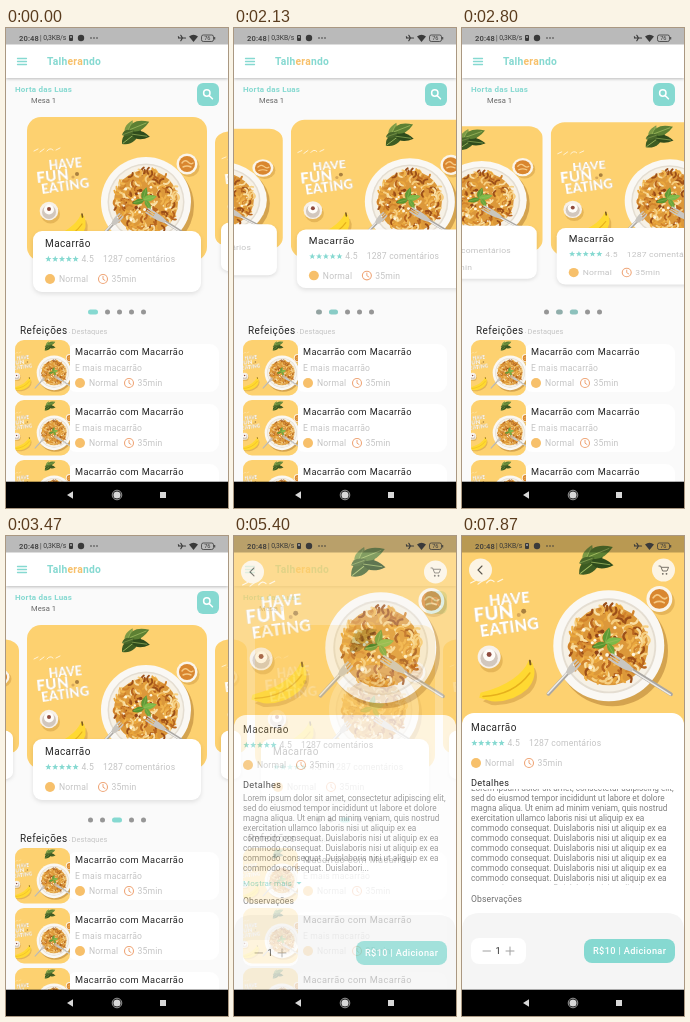
Animation of 222x480 px, one loop 8 s. Source, as an HTML page:

```html
<!DOCTYPE html>
<html lang="pt">
<head>
<meta charset="utf-8">
<title>Cardápio</title>
<style>
html, body { margin: 0; width: 100%; height: 100%; overflow: hidden; background: #fafafa; }
svg { display: block; width: 100vw; height: 100vh; font-family: Roboto, "Noto Sans", sans-serif; }
text { white-space: pre; }
.soft { filter: drop-shadow(0 2px 2px rgba(0,0,0,.1)); }
</style>
</head>
<body>
<svg id="stage" viewBox="0 0 222 480" preserveAspectRatio="none"></svg>
<script>
const LOOP = 8000, TEAL = '#86d9d1', AMBER = '#f7c06b', DARK = '#262626', PALE = '#c4c4c4', YELLOW = '#fdd170';
const CARDS = 5, PITCH = 188;

let seed = 11;
const rnd = () => (seed = seed * 16807 % 2147483647) / 2147483647;
const rep = (n, fn) => Array.from({length: n}, (_, i) => fn(i)).join('');
const rect = (x, y, w, h, fill, r = 0, more = '') =>
  `<rect x="${x}" y="${y}" width="${w}" height="${h}" rx="${r}" fill="${fill}" ${more}/>`;
const dot = (x, y, r, fill, more = '') => `<circle cx="${x}" cy="${y}" r="${r}" fill="${fill}" ${more}/>`;
const line = (d, color, w = 1, more = '') =>
  `<path d="${d}" fill="none" stroke="${color}" stroke-width="${w}" stroke-linecap="round" ${more}/>`;
const fill = (d, color, more = '') => `<path d="${d}" fill="${color}" ${more}/>`;
// y is the middle of the capitals
const text = (x, y, str, size, color, gap = .17, more = '') =>
  `<text x="${x}" y="${y + size * .36}" font-size="${size}" fill="${color}" letter-spacing="${gap}" ${more}>${str}</text>`;
const use = (id, x, y, scale = 1) => `<use href="#${id}" transform="translate(${x} ${y}) scale(${scale})"/>`;

// ---- food picture, 180 x 144 ----
const PX = 119, PY = 85;
function leaf(x, y, angle, size, color) {
  return `<g transform="translate(${x} ${y}) rotate(${angle}) scale(${size})">` +
    fill('M0 0Q6 -9 19 0Q7 8 0 0Z', color) + line('M1 0H16', '#a3bd62', .6) + '</g>';
}
function inBowl(radius) {
  const a = rnd() * 6.283, r = Math.sqrt(rnd()) * radius;
  return [PX + r * Math.cos(a), PY + r * Math.sin(a)].map(v => +v.toFixed(1));
}
function pasta() {
  const tones = ['#e9a63c', '#f6cf82', '#b8651f', '#f9dfa4', '#d1822b', '#f0b44e', '#9c4f18'];
  return rep(170, i => {
    const [x, y] = inBowl(32), b = rnd() * 6.283;
    const dx = +(3 * Math.cos(b)).toFixed(1), dy = +(3 * Math.sin(b)).toFixed(1);
    return line(`M${x - dx} ${y - dy}q${dx - dy} ${dy + dx} ${2 * dx} ${2 * dy}`, tones[i % tones.length], 1.9);
  }) + rep(26, i => {
    const [x, y] = inBowl(i % 2 ? 26 : 14);
    return dot(x, y, (.8 + rnd()).toFixed(1), i % 4 ? '#fdf6e0' : '#8f4318');
  });
}
function fork(x, y, angle, size) {
  return `<g transform="translate(${x} ${y}) rotate(${angle}) scale(${size} 1)">` +
    line('M0 0H27', '#aaa7a3', 3) + line('M0 -.6H27', '#eeece8', 1.2) +
    fill('M25 -1.500Q30 -4 40 -3V-1.500H34V-.5H40V.5H34V1.500H40V3Q30 4 25 1.500Z', '#c9c6c0') + '</g>';
}
const slogan = (x, y, str, size, angle) =>
  `<text x="${x}" y="${y}" font-size="${size}" font-family="Lato, sans-serif" font-weight="900" fill="#fff" transform="rotate(${angle} ${x} ${y})" style="filter:drop-shadow(.7px .9px .3px rgba(130,85,20,.6))">${str}</text>`;
const food = rect(0, -8, 180, 162, YELLOW) +
  leaf(95, 27, -38, 1.3, '#3d5c22') + leaf(99, 18, -66, .85, '#7d9a45') + leaf(104, 17, 8, 1, '#2f4c1c') +
  leaf(102, 13, -22, 1.15, '#5d8033') + leaf(95, 18, -20, .7, '#48662a') +
  line('M7 34l4 -2m2 3l4 -3m3 2q3 -4 6 -1m3 0l4 -2', '#fff', .9, 'opacity=".8"') +
  slogan(22, 52.5, 'HAVE', 12.3, -5) + slogan(10, 66, 'FUN', 15.5, -6) + slogan(15, 77.5, 'EATING', 13.3, -8) +
  dot(50, 57, 2, '#a9803f') + dot(46, 60, 1.6, '#d8a85a') +
  dot(23.5, 97, 9.5, '#d09c40', 'opacity=".5"') + dot(22, 94, 9.3, '#f7f1ea') + dot(22, 95, 7, '#d2c7bd') + dot(22, 92.5, 5, '#fffdf9') + dot(22, 92, 2, '#8e4b3f') +
  fill('M59 103Q64 113 55 123Q42 134 24 133L17 130Z', '#c9953f', 'opacity=".5"') +
  fill('M57 99Q62 110 53 120Q41 131 24 130L14 127L15 123Q31 119 41 112Q51 105 54 97Z', '#ffd932') +
  line('M17 126Q42 125 55 107', '#e6b01c', 1.2) + line('M55.500 100L55 97', '#7b5a20', 1.6) +
  dot(162, 49.500, 10.500, '#cf9a42', 'opacity=".5"') + dot(160, 47, 10.500, '#fbf5ea') + dot(160, 47, 8, '#d9862f') +
  line('M155 46q3 -4 6 -1t5 1M156 50q4 -2 8 0', '#f6c983', 1.4) +
  dot(PX + 3, PY + 4, 45, '#b9853a', 'opacity=".6"') + dot(PX, PY, 45, '#faf8f4') + dot(PX, PY, 38.500, '#e4ddd1') + dot(PX, PY, 37, '#f6f1e6') +
  dot(PX, PY, 32, '#dc983a') + pasta() +
  leaf(116, 83, -75, .7, '#5f9a35') + leaf(116, 83, -15, .75, '#7cba48') + leaf(117, 83, 165, .65, '#58952f') + leaf(118, 83, 60, .6, '#6ba53b') +
  fork(70, 124, -47, .9) + fork(169, 124, -148, 1.450);

// ---- shared blocks ----
const star = 'M0 -3.6L1 -1.1 3.5 -1 1.5 .6 2.2 3.1 0 1.7 -2.2 3.1 -1.5 .6 -3.5 -1 -1 -1.1Z';
const effort = (x, y, gap) => dot(x + 5, y, 5, AMBER) + text(x + 14, y, 'Normal', 8.6, PALE) +
  dot(x + gap, y, 4.5, 'none', 'stroke="#efa678" stroke-width="1.1"') +
  line(`M${x + gap} ${y - 2.6}v2.8l2 1.3`, '#efa678', 1) + text(x + gap + 8.5, y, '35min', 8.6, PALE);
const info = text(0, 0, 'Macarrão', 10, DARK, .4) +
  rep(5, i => fill(star, TEAL, `transform="translate(${3.4 + 6.8 * i} 16) scale(.88)"`)) +
  text(36.5, 16, '4.5', 8.6, PALE) + text(58, 16, '1287 comentários', 8.6, PALE) + effort(0, 36, 58);
const card = `<g clip-path="url(#cardClip)">${use('food', 0, 0)}</g>` +
  rect(6, 114, 168, 61, '#fff', 9, 'class="soft"') + use('info', 18, 126);
const row = rect(52, 4, 152, 48, '#fff', 9) +
  `<g clip-path="url(#thumbClip)">${use('food', -6.9, 0, .386)}</g>` +
  text(60, 12, 'Macarrão com Macarrão', 9.2, DARK, .38) + text(60, 28, 'E mais macarrão', 8.6, PALE) + effort(60, 43, 54);

// ---- menu page ----
const menu = rect(0, 0, 222, 480, '#fafafa') +
  rep(CARDS, i => `<g id="card${i}">${use('card', 0, 0)}</g>`) +
  rect(0, 0, 222, 50, '#fff', 0, 'style="filter:drop-shadow(0 1px 1.5px rgba(0,0,0,.25))"') +
  line('M11.5 30.500h9M11.5 33.5h9M11.5 36.500h9', TEAL, 1.3) +
  text(41, 33.5, `Talh<tspan fill="${AMBER}">era</tspan>ndo`, 10.3, TEAL, .25, 'font-weight="700"') +
  text(9, 61, 'Horta das Luas', 8, TEAL, .2, 'font-weight="700"') + text(25, 72.5, 'Mesa 1', 7.6, '#666', .05) +
  rect(191, 55, 22, 23, TEAL, 6) + dot(200.8, 65, 3.2, 'none', 'stroke="#fff" stroke-width="1.5"') + line('M203.4 67.8l3 3', '#fff', 1.6) +
  rep(CARDS, i => `<rect id="dot${i}" y="281.5" height="5" rx="2.5"/>`) +
  text(14, 302, 'Refeições', 10, DARK, .4) + text(62.5, 302, '.', 8, PALE) + text(65.5, 303, 'Destaques', 7.4, PALE, .1) +
  rep(3, i => use('row', 9, 312 + 60 * i));

// ---- detail page ----
const MORE = 'commodo consequat. Duislaboris nisi ut aliquip ex ea';
const LINES = ['Lorem ipsum dolor sit amet, consectetur adipiscing elit,',
  'sed do eiusmod tempor incididunt ut labore et dolore',
  'magna aliqua. Ut enim ad minim veniam, quis nostrud',
  'exercitation ullamco laboris nisi ut aliquip ex ea', MORE, MORE, MORE];
const para = lines => lines.map((s, i) => text(9, 260 + 10 * i, s, 8.25, '#808080', 0)).join('');
const detail = rect(0, 0, 222, 480, YELLOW) + use('food', 0, 5, 1.2334) +
  dot(18.5, 34, 11.5, '#fcf4e4') + line('M20 30l-4 4 4 4', '#5a554c', 1.1) +
  dot(201.5, 34, 11.5, '#fcf4e4') + line('M197 30h1.6l2 5h4.4l1.6 -3.700h-7', '#6a655c', .9) + dot(200.800, 37.800, .9, '#6a655c') + dot(204.500, 37.800, .9, '#6a655c') +
  rect(0, 177, 222, 310, '#fff', 12) + use('info', 9, 191) +
  text(9, 247, 'Detalhes', 9.2, DARK, .3) +
  `<g id="short">${para([...LINES, 'commodo consequat. Duislabori...'])}${text(9, 345, 'Mostrar mais', 8, TEAL, .15)}${fill('M62.5 344h5l-2.5 2.5z', TEAL)}</g>` +
  `<g id="long" clip-path="url(#textClip)"><g id="scroll">${para([...LINES, ...Array(8).fill(MORE)])}</g></g>` +
  text(9, 363, 'Observações', 8.6, '#707070', .1) +
  fill('M0 460V395Q0 377 18 377H204Q222 377 222 395V460Z', '#f5f5f5') +
  rect(9, 402, 55, 26, '#fff', 8) + line('M21 415h7.5M44 415h8M48 411v8', '#a0a0a0', 1) + text(33.5, 415, '1', 9.2, DARK) +
  rect(122, 403, 91, 24, TEAL, 8) + text(131, 415, 'R$10 | Adicionar', 9.2, '#fff', .35, 'font-weight="500"');

// ---- system bars ----
const INK = '#3a3a3a';
const bars = rect(0, 0, 222, 16.5, 'rgba(0,0,0,.27)') +
  text(13, 10, '20:48', 7.6, INK, .15, 'font-weight="500"') + text(34, 10, '| 0,3KB/s', 6.8, INK, -.1) +
  rect(63, 7, 4, 6, INK, 1) + dot(65, 9, .9, '#bbb') + dot(75, 10, 3.2, INK) + rep(3, i => dot(85 + 3 * i, 10, .8, INK)) +
  line('M172.500 10H179.500M176.500 10L174.800 7.300M176.500 10L174.800 12.700M173 10l-.6 -1.200', INK, 1.2) +
  fill('M183 8.5Q187.5 5 192 8.5L187.5 14Z', INK) +
  rect(195.500, 7, 12, 6.5, 'none', 1.8, `stroke="${INK}" stroke-width=".8"`) + text(198.2, 10.3, '76', 5.6, INK, 0) + rect(208.2, 9, 1, 2.5, INK) +
  rect(0, 453.7, 222, 26.3, '#000') + fill('M61 467l6 -3.700v7.400z', '#d8d8d8') +
  dot(111, 467, 3.6, '#d8d8d8') + dot(111, 467, 4.8, 'none', 'stroke="#d8d8d8" stroke-width=".7"') + rect(154, 464, 6, 6, '#d8d8d8');

const clip = (id, x, y, w, h, r) => `<clipPath id="${id}">${rect(x, y, w, h, '#000', r)}</clipPath>`;
const group = (id, body) => `<g id="${id}">${body}</g>`;
document.getElementById('stage').innerHTML =
  `<defs>${clip('cardClip', 0, 0, 180, 144, 14)}${clip('thumbClip', 0, 0, 55, 55.5, 9)}${clip('textClip', 0, 253, 222, 95.5, 0)}` +
  group('food', food) + group('info', info) + group('card', card) + group('row', row) + '</defs>' +
  group('menu', menu) + group('detail', detail) + bars;

// ---- motion ----
const el = id => document.getElementById(id);
const set = (id, attrs) => { for (const k in attrs) el(id).setAttribute(k, attrs[k]); };
const show = (id, on) => { el(id).style.display = on ? '' : 'none'; };

// Smooth monotone curve through [time, value] keys
function curve(keys, t) {
  const n = keys.length - 1;
  if (t <= keys[0][0]) return keys[0][1];
  if (t >= keys[n][0]) return keys[n][1];
  const slope = i => i < 0 || i >= n ? 0 : (keys[i + 1][1] - keys[i][1]) / (keys[i + 1][0] - keys[i][0]);
  const tangent = i => {
    const a = slope(i - 1), b = slope(i);
    return a * b > 0 ? 2 * a * b / (a + b) : 0;
  };
  const i = keys.findIndex((k, j) => t < keys[j + 1][0]);
  const [t0, a] = keys[i], [t1, b] = keys[i + 1], w = t1 - t0, u = (t - t0) / w, v = 1 - u;
  return a * (1 + 2 * u) * v * v + b * u * u * (3 - 2 * u) + w * u * v * (tangent(i) * v - tangent(i + 1) * u);
}
const PAGE = [[1480, 0], [1870, .181], [2080, .72], [2250, .95], [2400, .99], [2480, 1], [2530, 1],
  [2800, 1.638], [3000, 1.92], [3200, 1.985], [3470, 2]];
const FADE = [[5270, 0], [5330, .4], [5400, .76], [5490, 1]];
const RISE = [[5270, 60], [5330, 18], [5400, 2], [5490, 0]];
const SCROLL = [[6300, 0], [6600, 18], [6930, 30], [7450, 30], [7870, 7.5]];

function mix(a, b, k) {
  return `rgb(${a.map((v, i) => Math.round(v + (b[i] - v) * k))})`;
}
function draw(t) {
  const page = curve(PAGE, t);
  let x = 82;
  for (let i = 0; i < CARDS; i++) {
    const near = Math.max(0, 1 - Math.abs(i - page)), s = .8 + .2 * near;
    set('card' + i, {transform: `translate(${21 + PITCH * (i - page)} ${89 + 72 * (1 - s)}) scale(1 ${s})`});
    set('dot' + i, {x, width: 5 + 5 * near, fill: mix([150, 150, 150], [134, 217, 209], near)});
    x += 12 + 5 * near;
  }
  const open = t >= 5320, full = t >= 6270;
  show('menu', t < 5490);
  show('detail', open);
  show('short', !full);
  show('long', full);
  set('detail', {opacity: curve(FADE, t), transform: `translate(0 ${curve(RISE, t)})`});
  set('scroll', {transform: `translate(0 ${-curve(SCROLL, t)})`});
}
const start = performance.now();
function tick() {
  draw((performance.now() - start) % LOOP);
  requestAnimationFrame(tick);
}
tick();
</script>
</body>
</html>
```
